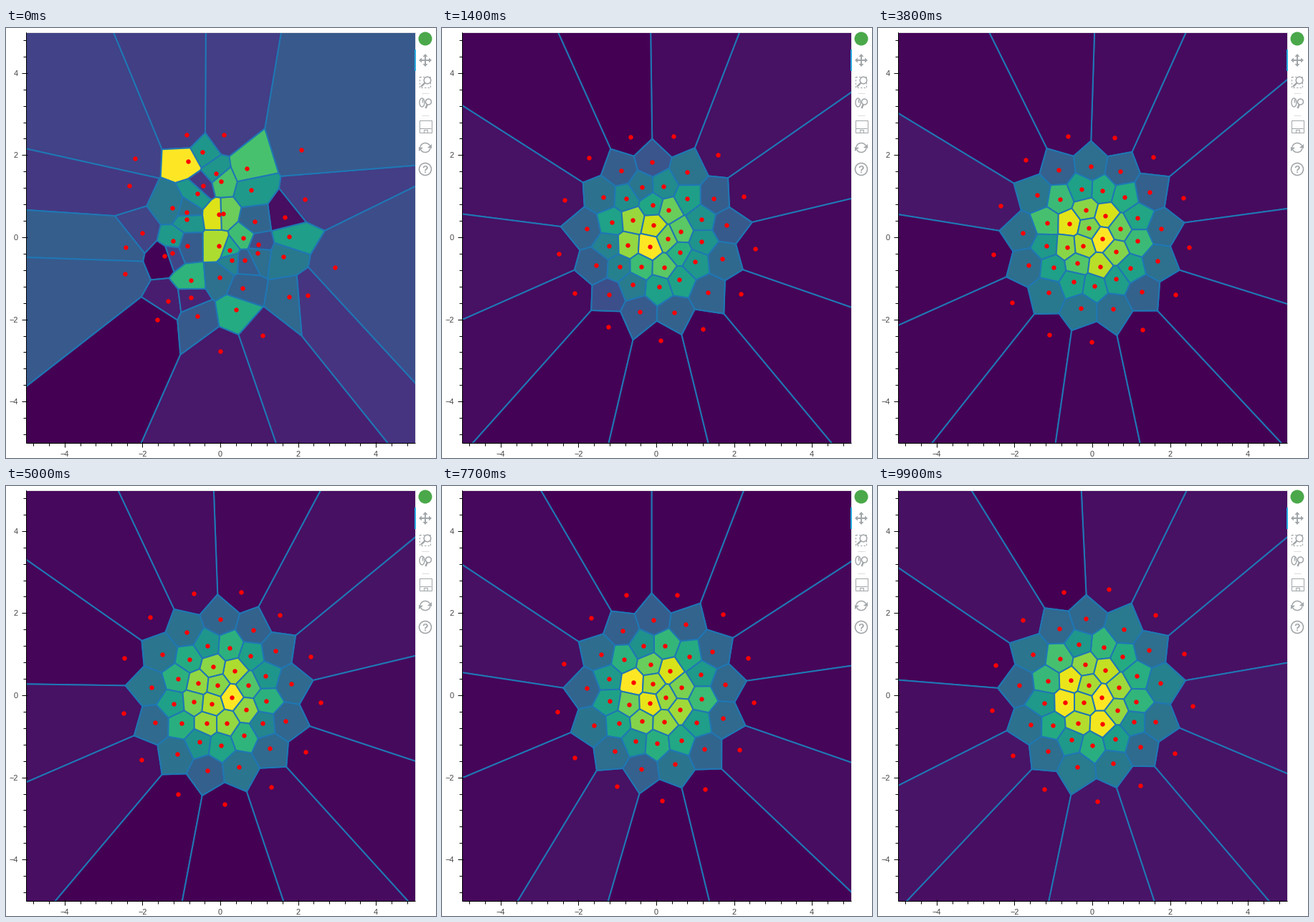
Recreate the animation shown at these times as a matplotlib script. Size 600 by 600 pixels, loop 10000 ms.

```python
import numpy as np
import matplotlib.pyplot as plt
from matplotlib.animation import FuncAnimation
from matplotlib.collections import PolyCollection
from matplotlib.patches import Arc, Circle, Ellipse, Polygon, Rectangle

FRAMES = 100
PX = 0.72                      # points per pixel at 100 dpi
X0, X1, Y0, Y1 = 27.5, 570.5, 5.5, 578.5
CX, CY = (X0 + X1) / 2, (Y0 + Y1) / 2
SX, SY = (X1 - X0) / 10, (Y1 - Y0) / 10
BLUE, GREY = "#1f77b4", "#a1a6a9"

# Settled layout: sites per ring, radius, angle of the first site
RINGS = [(13, 2.55, 22.7), (13, 1.80, 8.6), (13, 1.22, 22.3),
         (8, 0.72, 15), (3, 0.27, -12)]

axis = np.linspace(-4, 4, 130)
grid = np.stack(np.meshgrid(axis, axis), -1).reshape(-1, 2)
weight = np.exp(-(grid ** 2).sum(1) / 2)


def to_px(p):
    return np.asarray(p) * (SX, -SY) + (CX, CY)


def owners(sites):
    """Index of the nearest site for every grid point."""
    return ((sites ** 2).sum(1) - 2 * grid @ sites.T).argmin(1)


def relax(sites):
    """Move each site to the normal-weighted centroid of its cell."""
    own, n = owners(sites), len(sites)
    mass = np.bincount(own, weight, n)
    sums = [np.bincount(own, weight * g, n) for g in grid.T]
    return np.stack(sums, 1) / mass[:, None]


def unit(v):
    return (v - v.min()) / (v.max() - v.min())


def ring(n, radius, phase):
    a = np.radians(phase + 360 / n * np.arange(n))
    return radius * np.stack([np.cos(a), np.sin(a)], 1)


def make_paths(rng):
    """A scattered start decays to the settled layout, with a small wander."""
    home = np.concatenate([ring(*r) for r in RINGS])
    for _ in range(3):
        home = relax(home)
    spread = 0.6 + 0.4 * np.hypot(*home.T)[:, None]
    scatter = rng.normal(0, 0.27, home.shape)
    wander = np.zeros_like(home)
    paths = []
    for k in range(FRAMES):
        paths.append(home + scatter * np.exp(-k / 7) + wander)
        wander = 0.7 * wander + rng.normal(0, 0.022, home.shape) * spread
    return paths


def clip(poly, a, b, c):
    """Part of the polygon where a*x + b*y <= c."""
    out = []
    px, py = poly[-1]
    pd = a * px + b * py - c
    for x, y in poly:
        d = a * x + b * y - c
        if (d > 0) != (pd > 0):
            s = pd / (pd - d)
            out.append((px + s * (x - px), py + s * (y - py)))
        if d <= 0:
            out.append((x, y))
        px, py, pd = x, y, d
    return out


def voronoi(sites):
    pts = sites.tolist()
    cells = []
    for i, (x, y) in enumerate(pts):
        cell = [(-9, -9), (9, -9), (9, 9), (-9, 9)]
        for j, (u, v) in enumerate(pts):
            if i != j:
                cell = clip(cell, u - x, v - y,
                            (u * u + v * v - x * x - y * y) / 2)
        cells.append(to_px(cell))
    return cells


def levels(sites, k):
    """Cell probability; random first estimates fade out."""
    mass = unit(np.bincount(owners(sites), weight, len(sites)))
    fade = np.exp(-k / 6)
    return unit(fade * first_guess + (1 - fade) * mass)


fig = plt.figure(figsize=(6, 6), dpi=100, facecolor="white")
ax = fig.add_axes([0, 0, 1, 1])
ax.set(xlim=(0, 600), ylim=(600, 0))
ax.axis("off")


def line(xs, ys, color="black", width=1.0, **kw):
    ax.plot(xs, ys, color=color, lw=width * PX, solid_capstyle="butt", **kw)


def shape(patch):
    ax.add_patch(patch)


def label(x, y, text, **kw):
    ax.text(x, y, text, family="Liberation Sans", **kw)


def draw_axes():
    line([X0, X1, X1], [Y0, Y0, Y1], "#e5e5e5", zorder=4)
    line([X0, X0], [Y0, Y1], zorder=5)
    line([X0, X1], [Y1, Y1], zorder=5)
    for n in range(-12, 13):
        v = n * 0.4
        x, y = to_px((v, v))
        big = n % 5 == 0
        inner, outer = (2, 6) if big else (0, 4)
        line([X0 + inner, X0 - outer], [y, y], zorder=5)
        line([x, x], [Y1 - inner, Y1 + outer], zorder=5)
        if big:
            text = str(round(v)).replace("-", "\u2212")
            style = dict(fontsize=11 * PX, color="#444444")
            label(X0 - 11, y, text, ha="right", va="center_baseline", **style)
            label(x, 597.5, text, ha="center", va="baseline", **style)


def lens(x, y, r, hx, hy):
    shape(Circle((x, y), r, fc="white", ec=GREY, lw=1.5 * PX, zorder=6))
    d = np.hypot(hx - x, hy - y)
    line([x + (hx - x) * r / d, hx], [y + (hy - y) * r / d, hy], GREY, 2.4,
         zorder=6)


def draw_toolbar():
    x = 585
    shape(Circle((x, 15), 9.5, fc="#4aa84a", ec="none"))
    shape(Rectangle((570, 30), 2, 30, fc="#26aae1", ec="none", zorder=6))
    # Pan
    line([x - 6, x + 6], [45, 45], GREY, 2)
    line([x, x], [39, 51], GREY, 2)
    for dx, dy in ((1, 0), (-1, 0), (0, 1), (0, -1)):
        tip = [(x + 9 * dx, 45 + 9 * dy)]
        tip += [(x + 5 * dx + s * dy, 45 + 5 * dy + s * dx)
                for s in (-3.5, 3.5)]
        shape(Polygon(tip, fc=GREY, ec="none"))
    # Box zoom
    shape(Rectangle((576.5, 67.5), 15, 15, fill=False, ec=GREY, lw=PX,
                    ls=(0, (2.5, 2))))
    lens(588, 73, 4.8, 579, 82)
    # Wheel zoom
    shape(Ellipse((580.5, 104), 7, 12, fill=False, ec=GREY, lw=1.4 * PX))
    line([580.5, 580.5], [99, 104], GREY, 1.4)
    lens(589.5, 103, 4, 585.5, 112)
    for y in (90.5, 121.5):
        line([580, 590], [y, y], "#dddddd")
    # Save
    shape(Rectangle((576.5, 128.5), 17, 17, fill=False, ec=GREY, lw=PX))
    line([577, 593], [139.5, 139.5], GREY)
    shape(Rectangle((582.5, 141.5), 5, 4, fill=False, ec=GREY, lw=PX))
    # Reset
    for a, b in ((190, 335), (10, 155)):
        shape(Arc((x, 167), 14, 13, theta1=a, theta2=b, ec=GREY,
                  lw=1.5 * PX))
    shape(Polygon([(594, 162), (594, 168), (588, 167)], fc=GREY, ec="none"))
    shape(Polygon([(576, 172), (576, 166), (582, 167)], fc=GREY, ec="none"))
    # Help
    shape(Circle((x, 197), 8.5, fill=False, ec=GREY, lw=1.6 * PX))
    label(x, 197.5, "?", ha="center", va="center", fontsize=14 * PX,
          color=GREY, weight="bold")


draw_axes()
draw_toolbar()

rng = np.random.default_rng(4)
paths = make_paths(rng)
first_guess = unit(rng.normal(0, 1, len(paths[0])))
# The open outer cells start out closer to the middle of the scale
outer = RINGS[0][0]
first_guess[:outer] = 0.2 + 0.3 * first_guess[:outer]

cells = PolyCollection([], edgecolors=BLUE, linewidths=2 * PX, zorder=2)
ax.add_collection(cells, autolim=False)
cells.set_clip_path(Rectangle((X0, Y0), X1 - X0, Y1 - Y0,
                              transform=ax.transData))
dots = ax.scatter(*to_px(paths[0]).T, s=(6.4 * PX) ** 2, c="red",
                  linewidths=0, zorder=3)


def update(k):
    sites = paths[k]
    cells.set_verts(voronoi(sites))
    cells.set_facecolor(plt.cm.viridis(levels(sites, k)))
    dots.set_offsets(to_px(sites))
    return cells, dots


anim = FuncAnimation(fig, update, frames=FRAMES, interval=100, repeat=True,
                     repeat_delay=0)
plt.show()
```
